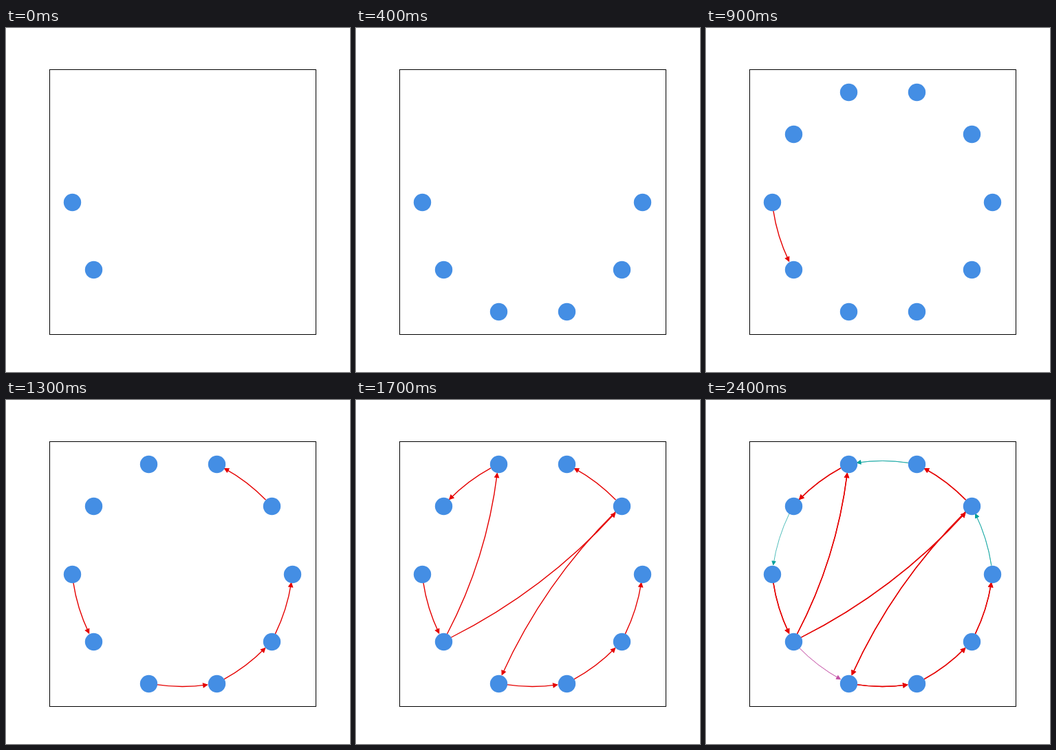
Animation, 500 px wide and 500 px high, one loop 2500 ms. Source, as an HTML page with a canvas:

```html
<!DOCTYPE html>
<html>
<head>
<meta charset="utf-8">
<style>
  html, body { margin: 0; width: 100%; height: 100%; overflow: hidden; background: #fff; }
  canvas { display: block; }
</style>
</head>
<body>
<canvas id="stage" width="500" height="500"></canvas>
<script>
const ctx = document.getElementById('stage').getContext('2d');
const STEP = 100, STEPS = 25, PT = 100 / 72;
const GAP = 8.66 * PT, HEAD = 4 * PT, HALF = 2 * PT;
const BLUE = '#448ee4', RED = '#e50000', TEAL = '#02a09b', PINK = '#c452a6';

// Ten nodes on an ellipse, counterclockwise from the left
const nodes = Array.from({ length: 10 }, (_, i) => {
  const a = Math.PI - i * Math.PI / 5;
  return [256.25 + 160.12 * Math.cos(a), 252.5 + 167.28 * Math.sin(a)];
});

const edge = (color, width) => ([from, to]) => ({ from, to, color, width: width * PT });
const red = [[1, 2], [3, 4], [4, 5], [5, 6], [7, 8], [9, 10], [2, 7], [2, 9], [7, 3]].map(edge(RED, 1));
const thin = [edge(PINK, 0.5)([2, 3]), ...[[6, 7], [8, 9], [10, 1]].map(edge(TEAL, 0.5))];

function drawNode([x, y]) {
  ctx.fillStyle = BLUE;
  ctx.beginPath();
  ctx.arc(Math.floor(x + 0.5) + 0.5, Math.floor(y + 0.5) + 0.5, 12.7, 0, 7);
  ctx.fill();
}

function drawEdge({ from, to, color, width }) {
  const p = nodes[from - 1], q = nodes[to - 1];
  const dx = q[0] - p[0], dy = q[1] - p[1];
  const c = [(p[0] + q[0]) / 2 - 0.1 * dy, (p[1] + q[1]) / 2 + 0.1 * dx];
  const blossom = (a, b) => [0, 1].map(k =>
    (1 - a) * (1 - b) * p[k] + (a + b - 2 * a * b) * c[k] + a * b * q[k]);
  // Curve parameter where the distance to a node equals r
  const cut = (node, inside, outside, r) => {
    for (let i = 0; i < 24; i++) {
      const m = (inside + outside) / 2, [x, y] = blossom(m, m);
      if (Math.hypot(x - node[0], y - node[1]) < r) inside = m; else outside = m;
    }
    return inside;
  };
  const a = cut(p, 0, 0.5, GAP);
  const b = cut(q, 1, 0.5, GAP + width * 0.5 * Math.sqrt(5));
  const start = blossom(a, a), mid = blossom(a, b), tip = blossom(b, b);
  const angle = Math.atan2(tip[1] - mid[1], tip[0] - mid[0]);

  ctx.strokeStyle = ctx.fillStyle = color;
  ctx.lineWidth = width;
  ctx.beginPath();
  ctx.moveTo(...start);
  ctx.quadraticCurveTo(...mid, ...tip);
  ctx.stroke();

  ctx.save();
  ctx.translate(...tip);
  ctx.rotate(angle);
  ctx.beginPath();
  ctx.moveTo(0, 0);
  ctx.lineTo(-HEAD, HALF);
  ctx.lineTo(-HEAD, -HALF);
  ctx.closePath();
  ctx.fill();
  ctx.stroke();
  ctx.restore();
}

function draw(step) {
  ctx.fillStyle = '#fff';
  ctx.fillRect(0, 0, 500, 500);
  ctx.strokeStyle = '#000';
  ctx.lineWidth = 1;
  ctx.strokeRect(63.5, 60.5, 387, 385);

  red.slice(0, Math.max(0, step - 8)).forEach(drawEdge);
  // Later passes repeat edges, which deepens their antialiased rims
  if (step >= 18) {
    red.forEach(drawEdge);
    thin.slice(0, step - 17).forEach(drawEdge);
    thin.slice(0, Math.max(0, step - 21)).forEach(drawEdge);
  }
  nodes.slice(0, step + 2).forEach(drawNode);
}

function tick() {
  draw(Math.floor(performance.now() / STEP) % STEPS);
  requestAnimationFrame(tick);
}
tick();
</script>
</body>
</html>
```
